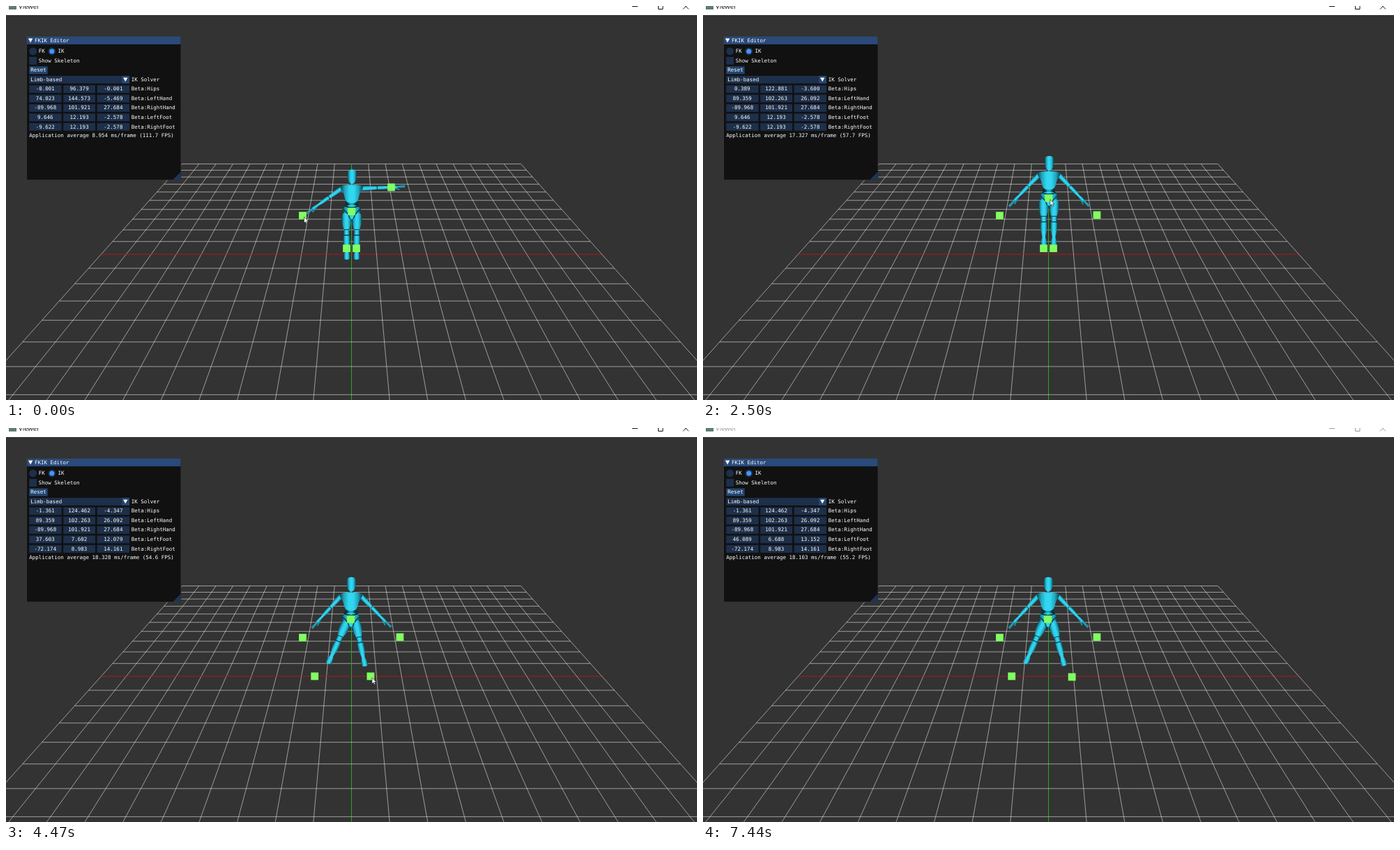
An HTML page with a canvas that plays this animation: 991x565 px, repeating every 7.46 s.

```html
<!DOCTYPE html>
<html lang="en">
<head>
<meta charset="utf-8">
<title>Viewer</title>
<style>
html, body { margin: 0; width: 100%; height: 100%; overflow: hidden; background: #333; }
#stage { position: relative; width: 991px; height: 565px; overflow: hidden; }
#scene { position: absolute; left: 0; top: 0; }
#bar { position: absolute; left: 0; top: 0; width: 991px; height: 12.5px; background: #fff; color: #111; overflow: hidden; }
#bar.idle { color: #999; }
#bar i { position: absolute; left: 4px; top: 0; width: 11px; height: 5px; background: #5f7d72; }
#bar b { position: absolute; left: 18px; top: -6px; font: 400 9.6px/14px "Open Sans", sans-serif; text-rendering: geometricPrecision; }
#bar svg { position: absolute; left: 890px; top: 0; }
#panel {
  position: absolute; left: 30px; top: 44px; width: 342px; height: 318px;
  transform: scale(.645); transform-origin: 0 0;
  background: #111; box-shadow: 0 0 0 1px #38383f; color: #fff;
  font: 11.63px/17px "DejaVu Sans Mono", monospace; white-space: pre; text-rendering: geometricPrecision;
}
#panel > * { position: absolute; height: 17px; }
#panel .title { left: 0; top: 0; width: 342px; background: #294a7a; }
.title span { position: absolute; left: 17px; }
.box { background: #1d2f4a; text-align: center; }
.box.hover, .btn { background: #24466f; }
.round { border-radius: 50%; width: 17px; }
.on::after { content: ""; position: absolute; inset: 3px; border-radius: 50%; background: #4296fa; }
.down::before { content: ""; position: absolute; left: 3px; top: 4px; border: solid transparent; border-width: 9px 5.5px 0; border-top-color: #fff; }
#panel .grip { right: 0; bottom: 0; width: 17px; background: linear-gradient(135deg, transparent 50%, #1d3556 50%); }
#cursor { position: absolute; left: 0; top: 0; overflow: visible; }
</style>
</head>
<body>
<div id="stage">
  <canvas id="scene" width="991" height="565"></canvas>
  <div id="bar"><i></i><b>Viewer</b>
    <svg width="101" height="12" fill="none" stroke="currentColor"><path d="M8 .5h8M45.500-3v7.500h6.500v-7.500M81 4.500l8-8M81-3.500l8 8"/></svg>
  </div>
  <div id="panel"></div>
  <svg id="cursor" width="8" height="12"><path d="M0 0V8.800L2 7L3.300 10L4.800 9.300L3.500 6.400H6.200Z" fill="#fff" stroke="#111" stroke-width=".6"/></svg>
</div>
<script>
const LOOP = 7460, SCALE = .645, ROW = 21, TOP = 24, COLUMN = 75.6, TRAVEL = 250;
const $ = id => document.getElementById(id);
const g = $('scene').getContext('2d');

const ease = u => { u = Math.min(1, Math.max(0, u)); return u * u * (3 - 2 * u); };
const mix = (a, b, u) => a.map((v, i) => v + (b[i] - v) * u);

// Keys are [time, ...values]; values ease from key to key.
function track(keys, t) {
  const i = keys.findIndex(k => k[0] > t);
  if (i < 1) return keys.at(i).slice(1);
  const a = keys[i - 1], b = keys[i];
  return mix(a, b, ease((t - a[0]) / (b[0] - a[0]))).slice(1);
}

// World coordinates to the screen, seen by a camera tilted down.
function project([x, y, z]) {
  const w = 1 - .000956 * z - .0005 * y;
  return [495.5 + .718 * x / w, -44.5 + (400.5 - .806 * y) / w];
}

const rest = {
  Hips: [-.001, 96.379, -.001],
  LeftHand: [74.023, 144.573, -5.469],
  RightHand: [-89.968, 101.921, 27.684],
  LeftFoot: [9.646, 12.193, -2.578],
  RightFoot: [-9.622, 12.193, -2.578]
};
const drags = [
  { name: 'LeftHand', from: 600, until: 1000, to: [89.359, 102.263, 26.092] },
  { name: 'Hips', from: 1500, until: 2010, to: [4.085, 119.54, -2.021] },
  { name: 'Hips', from: 2010, until: 2800, to: [-1.361, 124.462, -4.347] },
  { name: 'RightFoot', from: 3200, until: 3600, to: [-72.174, 8.983, 14.161] },
  { name: 'LeftFoot', from: 4050, until: 4470, to: [37.602, 7.602, 12.079] },
  { name: 'LeftFoot', from: 4470, until: 4620, to: [46.089, 6.688, 13.152] }
];
const place = (name, t) => drags.filter(d => d.name === name)
  .reduce((p, d) => mix(p, d.to, ease((t - d.from) / (d.until - d.from))), rest[name]);

// The pointer visits each drag, then roams over the panel and leaves.
const tip = (name, t) => project(place(name, t)).map(v => v + 2);
const pointer = [[100, ...tip('RightHand', 0)]];
for (const { name, from, until } of drags) {
  const arrive = Math.min(from, pointer.at(-1)[0] + TRAVEL);
  pointer.push([arrive, ...tip(name, from)], [from, ...tip(name, from)], [until, ...tip(name, until)]);
}
pointer.push([4680, 530, 358], [4930, 908, 488], [5300, 210, 170], [5600, 120, 106], [6200, 70, 106],
  [6370, 108, 120], [6430, 263, 184], [6800, 932, 546], [6980, 930, 580]);

const frameMs = [[0, 8.954], [1220, 14.61], [2010, 17.657], [3000, 16.988], [4470, 18.328], [6430, 17.135], [7440, 18.103]];

// Panel
function item(x, row, text = '', cls = '', w) {
  const d = document.createElement('div');
  d.className = cls;
  d.textContent = text;
  d.style.left = x + 'px';
  d.style.top = TOP + row * ROW + 'px';
  if (w) d.style.width = w + 'px';
  return $('panel').appendChild(d);
}
$('panel').innerHTML = '<div class="title down"><span>FKIK Editor</span></div><div class="grip"></div>';
item(5, 0, '', 'box round'); item(26, 0, 'FK');
item(47, 0, '', 'box round on'); item(69, 0, 'IK');
item(5, 1, '', 'box', 17); item(26, 1, 'Show Skeleton');
item(5, 2, 'Reset', 'box btn', 41);
const combo = item(5, 3, '', 'box', 223);
item(8, 3, 'Limb-based');
item(211, 3, '', 'btn down', 17);
item(232, 3, 'IK Solver');
const fields = Object.keys(rest).map((name, r) => {
  item(232, 4 + r, 'Beta:' + name);
  return [0, 1, 2].map(c => item(5 + c * COLUMN, 4 + r, '', 'box', 71.7));
});
const stats = item(5, 8.9);

function drawPanel(t, values) {
  const [px, py] = track(pointer, t - 50).map((v, i) => (v - (i ? 44 : 30)) / SCALE);
  const row = Math.floor((py - TOP) / ROW), col = Math.floor((px - 5) / COLUMN);
  combo.classList.toggle('hover', row === 3 && px > 5 && px < 228);
  fields.forEach((cells, r) => cells.forEach((cell, c) => {
    cell.textContent = values[r][c].toFixed(3);
    cell.classList.toggle('hover', row === 4 + r && col === c);
  }));
  const ms = track(frameMs, t)[0];
  stats.textContent = `Application average ${ms.toFixed(3)} ms/frame (${(1000 / ms).toFixed(1)} FPS)`;
}

// Ground grid, 50 units per cell
function line(a, b, color, w = .65) {
  g.strokeStyle = color;
  g.lineWidth = w;
  g.beginPath(); g.moveTo(...a); g.lineTo(...b); g.stroke();
}
function drawGrid() {
  const ground = (x, z) => project([x * 50, 0, z * 50]);
  const white = 'rgba(255,255,255,.8)';
  for (let i = -10; i <= 10; i++) {
    line(ground(i, -10), ground(i, 8), i ? white : '#28b428', i ? .65 : .9);
    if (i < 9) line(ground(-10, i), ground(10, i), i ? white : '#c01414', i ? .65 : .9);
  }
}

// Mannequin
const LIGHT = '#31d6f0', MID = '#20a3bb', DARK = '#07323c';

// A rounded body along a bone; widths are half widths at even steps.
function solid([x1, y1], [x2, y2], widths, core = LIGHT, body = MID) {
  const len = Math.hypot(x2 - x1, y2 - y1), max = Math.max(...widths);
  const side = s => widths.map((w, i) => [len * i / (widths.length - 1), s * w]);
  const pts = [...side(1), ...side(-1).reverse()];
  g.save();
  g.translate(x1, y1);
  g.rotate(Math.atan2(y2 - y1, x2 - x1));
  const shade = g.createLinearGradient(0, -max, 0, max);
  [DARK, body, core, core, body, DARK].forEach((c, i) => shade.addColorStop(i / 5, c));
  g.fillStyle = shade;
  g.beginPath();
  pts.forEach((p, i) => {
    const m = mix(p, pts[(i + 1) % pts.length], .5);
    i ? g.quadraticCurveTo(...p, ...m) : g.moveTo(...m);
  });
  g.quadraticCurveTo(...pts[0], ...mix(pts[0], pts[1], .5));
  g.fill();
  g.restore();
}
// Straight bone from a joint towards a goal; gives the point at a distance.
function bone(joint, goal, squeeze = 1) {
  const dx = (goal[0] - joint[0]) * squeeze, dy = goal[1] - joint[1], d = Math.hypot(dx, dy);
  return (r, off = 0) => [joint[0] + (dx * r - dy * off) / d, joint[1] + (dy * r + dx * off) / d];
}
function arm(s, goal) {
  const at = bone([14.5 * s, -33], goal);
  solid(at(-3), at(23), [2.5, 4, 3.3, 2.6, 2]);
  solid(at(21), at(43), [2, 3.2, 2.8, 1.8, 1.4]);
  solid(at(41), at(52), [1.4, 2.4, 2.6, 1.5]);
  for (const off of [-1.5, .5]) line(at(50, off * .5), at(62, off), MID, 1.5);
  line(at(45, s), at(54, 4 * s), MID, 1.5);
  line(at(22, -2), at(22, 2), DARK, 1);
}
function leg(s, goal) {
  const at = bone([7.5 * s, 7], goal, .75);
  solid(at(48), at(62), [1.8, 3, 4.2, 4.8, 4]);
  solid(at(24), at(52), [3.5, 4.6, 5.2, 4, 2.6, 2]);
  solid(at(-6), at(22), [4, 7, 7.5, 6.5, 4.6, 3]);
  solid(at(18), at(28), [2.5, 4.6, 4.6, 2.5]);
  line(at(27, -4), at(27, 4), DARK, 1.2);
  line(at(19, -3.5), at(19, 3.5), DARK, .9);
}
function drawBody(t, spots) {
  const [x, y] = spots.Hips;
  const goal = name => [spots[name][0] - x, spots[name][1] - y];
  g.save();
  g.translate(x + .3, y);
  leg(-1, goal('RightFoot'));
  leg(1, goal('LeftFoot'));
  solid([0, -17], [0, -4], [6, 8.5, 9.5, 8], MID, DARK);
  solid([0, -9], [0, 11], [8, 12, 14, 8, 3, 2]);
  g.strokeStyle = DARK;
  g.lineWidth = 1.3;
  for (const s of [-1, 1]) {
    g.beginPath();
    g.moveTo(13 * s, -3); g.quadraticCurveTo(6 * s, 0, 2.5 * s, 10);
    g.moveTo(10 * s, -8); g.quadraticCurveTo(0, -3, -10 * s, -8);
    g.stroke();
  }
  arm(-1, goal('RightHand'));
  arm(1, goal('LeftHand'));
  solid([0, -43], [0, -35], [2.6, 2.8, 4], MID, DARK);
  solid([0, -38.5], [0, -12], [15, 17, 12.5, 10.5, 9.5, 6]);
  solid([.5, -60.5], [.5, -39.5], [4, 6.8, 7, 6.4, 5, 2.6]);
  g.restore();
}

function draw(t) {
  g.fillStyle = '#333';
  g.fillRect(0, 0, 991, 565);
  drawGrid();
  const values = Object.keys(rest).map(name => place(name, t));
  const spots = Object.fromEntries(Object.keys(rest).map((name, i) => [name, project(values[i])]));
  drawBody(t, spots);
  g.fillStyle = '#80ff60';
  for (const [x, y] of Object.values(spots)) g.fillRect(x - 5.4, y - 5.4, 10.8, 10.8);
  drawPanel(t, values);
  const [x, y] = track(pointer, t);
  $('cursor').style.transform = `translate(${x}px, ${y}px)`;
  $('bar').className = t > 7050 ? 'idle' : '';
}

const start = performance.now();
function tick() {
  draw((performance.now() - start) % LOOP);
  requestAnimationFrame(tick);
}
tick();
</script>
</body>
</html>
```
